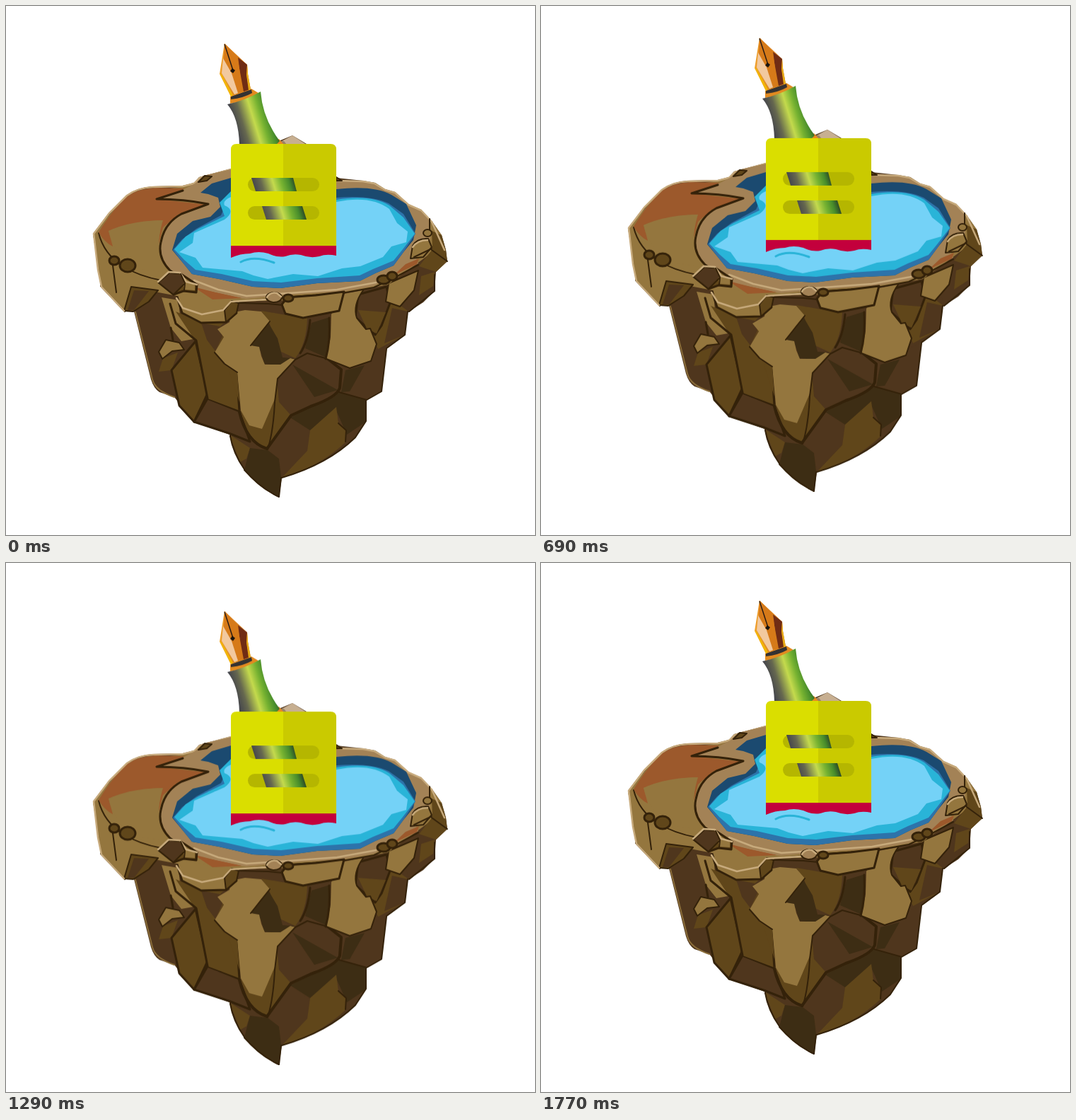
Write an HTML page that moves like this. It is 748 px wide and 748 px high and loops after 1800 ms.

```html
<!DOCTYPE html>
<html lang="en">
<head>
<meta charset="utf-8">
<title>Floating island</title>
<style>
  html, body { margin: 0; width: 100%; height: 100%; overflow: hidden; background: #fff; }
  svg { display: block; width: 100vw; height: 100vh; }

  .float { animation: drift 1800ms infinite; }
  @keyframes drift {
    0% { transform: translateY(0); animation-timing-function: steps(15, end); }
    25% { transform: translateY(-17.5px); animation-timing-function: steps(30, end); }
    75% { transform: translateY(17.5px); animation-timing-function: steps(14, end); }
    98.3333%, 100% { transform: translateY(0); }
  }

  .light { fill: #94763e; }
  .mid { fill: #60461a; }
  .dark { fill: #4f361d; }
  .deep { fill: #3d2d14; }
  .clay { fill: #9c592c; }
  .rim { fill: #a38256; }
  .ink { stroke: #34220a; stroke-width: 3; stroke-linejoin: round; stroke-linecap: round; }
  .thin { stroke-width: 2; }
  .bold { stroke-width: 4; }
  .line { fill: none; }
  .glow { fill: none; stroke: #c7aa7c; stroke-width: 2.5; stroke-linejoin: round; stroke-linecap: round; }
</style>
</head>
<body>
<svg viewBox="0 0 748 748" aria-label="Floating island with a pen">
  <defs>
    <linearGradient id="barrel" gradientUnits="userSpaceOnUse" x1="321" y1="160" x2="376" y2="143">
      <stop offset="0" stop-color="#45464c"/>
      <stop offset=".2" stop-color="#66684f"/>
      <stop offset=".48" stop-color="#c4da4d"/>
      <stop offset=".68" stop-color="#76b231"/>
      <stop offset=".86" stop-color="#478c2b"/>
      <stop offset="1" stop-color="#2d4a27"/>
    </linearGradient>
    <linearGradient id="gold" x1="0" x2="1">
      <stop offset="0" stop-color="#f0a02c"/>
      <stop offset="1" stop-color="#c96d12"/>
    </linearGradient>
  </defs>

  <g class="float">
    <!-- rock body -->
    <path class="dark" d="M123 322L145 293 170 268Q186 256 208 255L250 254 266 250 273 242 318 230 388 190 405 183 425 195 467 243 505 247 522 250 536 259 550 263 570 281 587 288 602 304 616 324 622 345 624 361 608 376 606 403 590 419 568 433 564 465 538 485 531 545 510 557 509 587 494 610Q455 648 390 667L386 695Q330 668 316 606L266 588 238 553 217 546Q209 541 205 528L181 432 168 432 134 397Z"/>
    <path class="line glow" style="stroke:#8a6d3a;stroke-width:2" d="M183 433L207 528Q211 544 238 553"/>
    <path class="mid" d="M222 498L243 490 234 515 216 517Z"/>
    <path class="dark" d="M316 606L345 625 337 656Q321 634 316 606Z"/>
    <path class="mid" d="M316 606L345 625 340 640 331 645Z"/>
    <path class="deep" d="M345 625L370 628 386 640 389 667 386 695Q355 680 337 656Z"/>
    <path class="dark" d="M370 627L402 582 430 601 428 628 390 667 386 640Z"/>
    <path class="deep" d="M402 582L470 546 510 558 509 588 482 606 466 570 430 600Z"/>
    <path class="mid" d="M430 600L467 567 470 590 480 599 481 616Q443 652 390 667L426 629Z"/>
    <path class="line ink thin" d="M390 667Q455 648 494 610L509 587V558M337 656Q360 682 386 694L389 667"/>
    <path class="line ink thin" d="M480 616L481 600 470 590M317 608Q321 632 337 655"/>
    <path class="dark" d="M474 514L538 484 531 545 510 557 471 546Z"/>
    <path class="deep" d="M480 515L507 508 486 545 474 546Z"/>
    <path class="line ink thin" d="M538 485L531 545 510 557 471 546"/>

    <!-- left columns -->
    <path class="light" d="M220 412L244 416 246 438 270 470 248 474 233 455Z"/>
    <path class="mid ink" d="M234 515L268 474 285 548 266 588 245 565Z"/>
    <path class="dark ink" d="M285 555L330 573 345 616 315 604 266 588Z"/>
    <path class="mid" d="M240 432L276 447 308 448 300 456 308 467 295 490 326 516 330 572 285 555 268 474Z"/>
    <path class="dark" d="M276 448L302 453 306 467 296 488 284 472Z"/>
    <path class="light ink thin" d="M216 489L226 472 245 476 252 486 235 488 221 499Z"/>
    <path class="line ink" d="M232 421L240 449 269 473 285 555 M233 455L236 472M326 517L330 572"/>

    <!-- central facets -->
    <path class="dark" d="M396 437L482 410 458 500 424 490 405 503 384 475Z"/>
    <path class="mid" d="M361 431L396 437 426 441Q425 478 409 498L385 487 372 447Z"/>
    <path class="dark" d="M408 501L425 491 454 498 474 514 470 545 402 579 386 558 383 527Z"/>
    <path class="deep" d="M405 507L469 543 436 553ZM423 484L432 448 458 440 453 497Z"/>
    <path class="mid" d="M383 527L386 560 403 579 370 627Q348 617 340 596L330 570 344 590 362 598Z"/>
    <path class="deep" d="M371 448L384 470 391 497 407 498 388 508 365 506 360 488 347 479Z"/>
    <path class="light" d="M318 434L338 430 361 432 373 446 360 461 346 480 358 482 361 495 366 507 388 507 402 498 409 500 384 527 380 556 362 598 344 593 332 572 327 518 309 506 295 490 308 468 299 457 316 447Z"/>
    <path class="mid" d="M314 513L327 518 330 560Z"/>
    <path class="line ink thin" d="M295 490L309 506 327 518M346 480L373 446M409 500L384 527M370 627Q378 602 380 560L384 527M409 500L426 491 455 499"/>
    <path class="line ink bold" d="M330 574Q340 617 369 626L403 579 431 566Q468 553 472 540L474 514 455 499"/>

    <!-- right facets -->
    <path class="mid" d="M539 410L568 431 564 465 526 485 517 464Z"/>
    <path class="dark" d="M546 427L568 432 564 465 535 477Z"/>
    <path class="dark ink" d="M498 408L538 397 543 420 531 452 522 465 494 440Z"/>
    <path class="mid" d="M498 430L537 433 524 463 510 456Z"/>
    <path class="light" d="M460 436L478 407 505 402Q490 423 496 441L509 457 515 456 524 478 516 502 486 512 453 499 459 468Z"/>
    <path class="line ink thin" d="M505 402Q490 423 496 441L509 457 515 456 524 478 516 502 486 512 453 499"/>
    <path class="line ink" d="M457 441Q459 474 452 499M430 444Q427 475 416 491"/>
    <path class="dark" d="M580 371L608 362 606 403 570 433 565 414Z"/>
    <path class="mid" d="M587 382L606 376 604 396 584 409Z"/>
    <path class="light ink thin" d="M541 392L583 374 577 402 557 425 537 418Z"/>
    <path class="line ink thin" d="M568 432L564 465 538 484M606 380V403L570 432"/>

    <!-- plateau -->
    <path class="light" d="M123 322L170 268 250 255 330 228H390L467 245 522 250 570 281 602 304 616 324 600 350 580 365 540 394 478 406 400 416 325 418 242 410 200 402 183 431 168 432 134 397Z"/>
    <path class="mid" d="M602 318L616 324 622 345 624 361 608 376 584 368 603 344Z"/>
    <path class="mid ink thin" d="M177 397L215 402 202 418 180 432 167 431Z"/>
    <path class="dark" d="M181 402L202 403 181 430 172 430Z"/>
    <path class="line ink thin" d="M131 321Q138 350 165 368Q188 382 220 388M151 367L156 405M134 396L168 432"/>
    <path class="clay" d="M131 320Q149 290 171 269Q188 258 211 257L253 258 213 273 285 281 243 295 222 313Q218 329 214 344L220 303Q177 305 145 318L151 340Q139 334 131 320Z"/>
    <path class="light" d="M145 318Q178 303 222 303Q212 335 219 357L240 379 188 372Q153 353 145 318Z"/>
    <path class="glow" d="M124 322L146 293 171 268Q186 257 208 256L250 255 266 251 274 243 318 231M124 322L130 373 135 397 167 431"/>

    <!-- rim -->
    <path class="rim" d="M213 273L250 260 267 251 279 240 318 231H390L467 246 505 248 521 251 536 260 550 264 569 281 587 289 600 305 600 329 577 351 583 364 548 382 520 396 475 404 405 408 340 414 290 408 265 396 232 374Q214 356 219 334Q224 307 248 294Q267 287 286 280Q252 273 213 273Z"/>
    <path class="line ink" d="M250 261L213 273Q252 273 286 280Q267 287 248 294Q224 307 219 334Q214 356 232 374L265 396"/>
    <path class="line ink thin" d="M330 418L405 411 475 406 520 398 548 385 583 366"/>
    <path class="clay" d="M265 397L296 405 333 413 292 414ZM565 365L584 357 581 365 548 381Z"/>
    <path class="glow" d="M470 247L505 248 521 251 536 260 550 264 569 281 587 289 602 305 620 345M266 388L300 401 340 410 400 406 468 401 523 391"/>
    <path class="mid ink thin" d="M272 249L281 240 291 241 284 247ZM467 242L475 247H467Z"/>

    <!-- pool -->
    <path fill="#1b4a70" d="M275 264L291 251 318 243H390L467 259Q520 253 545 267L566 280 580 310 576 331 562 348 548 367 522 378 500 389 440 392 388 399 349 397 301 386 263 379 250 363 235 345 242 322 264 304 289 298 303 284 300 271 286 266Z"/>
    <path fill="#2d73aa" d="M236 345L249 330 269 315 304 296 318 264 467 271Q515 267 541 279L562 294 579 322 562 348 548 367 522 378 500 389 440 392 388 399 349 397 301 386 263 379 250 363Z"/>
    <path fill="#29b4d8" d="M238 344L254 326 272 315 309 297 302 278 318 262V292L467 274Q516 266 542 282L562 299 578 322 561 344 548 360 519 372 500 381 440 385 389 391 349 389 305 379 268 373 252 359Z"/>
    <path fill="#74d2f7" d="M245 348L264 335 266 321 309 302Q326 289 309 282Q306 275 318 270L467 277Q516 267 542 287L553 307 568 319 566 334 545 340 533 355 501 368 475 371 441 382 406 379 370 386 350 381 334 375 278 370 268 356Z"/>
    <path fill="none" stroke="#29b4d8" stroke-width="3" stroke-linecap="round" d="M332 362Q350 352 379 363"/>

    <!-- front blocks -->
    <path class="light" d="M242 404L290 412 330 416 326 434 311 447 276 449 249 434Z"/>
    <path class="clay" d="M268 399L296 405 333 413 292 415Z"/>
    <path class="line ink" d="M242 412L249 434 276 448 311 447 326 434"/>
    <path class="mid ink thin" d="M309 430L319 417 329 420 326 434 311 447Z"/>
    <path class="glow" d="M241 413L250 427 277 436 307 430 318 418 367 415"/>
    <path class="light ink" d="M398 412L438 409 478 404 471 431 420 441 395 435 390 422Z"/>
    <path class="line ink thin" d="M329 420L371 421 391 423"/>
    <path class="mid ink" d="M216 391L231 377 246 378 270 394 269 405 251 403 237 408Z"/>
    <path class="light" d="M248 381L267 395 267 402 252 401Z"/>
    <path class="dark" d="M217 391L232 378 246 380 252 391 237 407Z"/>
    <path class="glow" d="M215 390L230 376 246 377 255 390 270 394"/>
    <path class="line ink thin" d="M238 407L253 392 247 379M253 392L252 402"/>

    <!-- pebbles -->
    <g class="mid ink">
      <ellipse cx="153" cy="360" rx="7" ry="6"/>
      <ellipse cx="172" cy="367" rx="11" ry="9"/>
      <ellipse cx="399" cy="413" rx="7" ry="5"/>
      <ellipse cx="534" cy="387" rx="9" ry="6"/>
      <ellipse cx="546" cy="382" rx="7" ry="6"/>
    </g>
    <ellipse class="rim ink thin" cx="379" cy="412" rx="11" ry="7"/>
    <path class="glow" d="M369 412Q373 404 383 406L389 411"/>
    <path class="light ink thin" d="M572 357L575 339Q581 328 597 329L602 341 590 355Z"/>
    <path class="glow" d="M575 341Q582 331 596 331"/>
    <path class="line ink thin" d="M602 345L624 361M599 301V316M577 355L602 343"/>
    <ellipse class="light ink thin" cx="596" cy="321" rx="6" ry="5"/>

    <!-- rear peak and pen -->
    <path fill="#c7af91" d="M388 192L405 183 425 196H390Z"/>
    <path fill="#9b8264" d="M388 191L393 191 397 196H388Z"/>
    <path fill="#e98a20" d="M374 196L386 188 393 196Z"/>
    <path fill="#e28a20" d="M317 128L347 117 357 123 338 134 317 138Z"/>
    <path fill="url(#barrel)" d="M313 139Q337 134 360 121Q363 159 387 191L382 196H330Q329 158 313 139Z"/>
    <path fill="#343232" d="M318 128L347 118 348 123Q336 130 318 132Z"/>
    <path fill="url(#gold)" d="M309 53L341 83 342 96 346 118 318 128 302 96Z"/>
    <path fill="#f2b705" d="M302 95L305 97 321 126 318 128Z"/>
    <path fill="#702c14" d="M327 72L341 83 340 97 344 118 336 121Z"/>
    <path fill="#e9ac16" d="M341 83L342 96 346 118 343 119 340 97Z"/>
    <path fill="#d67a19" d="M309 53L328 72 334 121 323 124 307 92Z"/>
    <path fill="#f2c99f" d="M307 74L319 95 328 123 323 125 305 95Z"/>
    <path fill="none" stroke="#241814" stroke-width="1.4" d="M309 54L321 91"/>
    <path fill="#18130f" d="M320 88L324 91 321 95 317 92Z"/>

    <!-- card -->
    <path fill="#dade00" d="M318 340V203Q318 195 326 195H393V340Z"/>
    <path fill="#caca00" d="M392 195H459Q467 195 467 203V340H392Z"/>
    <path fill="#c3003c" d="M318 339H467V353Q453 350 443 354Q430 357 417 352Q405 350 395 354Q383 356 371 350Q357 346 345 350Q331 350 318 356Z"/>
    <g fill="#b5b600">
      <rect x="342" y="243" width="101" height="19" rx="9.5"/>
      <rect x="342" y="283" width="101" height="19" rx="9.5"/>
    </g>
    <g fill="url(#barrel)">
      <path d="M347 243H406L411 262H353Z"/>
      <path d="M362 283H419L425 302H368Z"/>
    </g>
  </g>
</svg>
</body>
</html>
```
